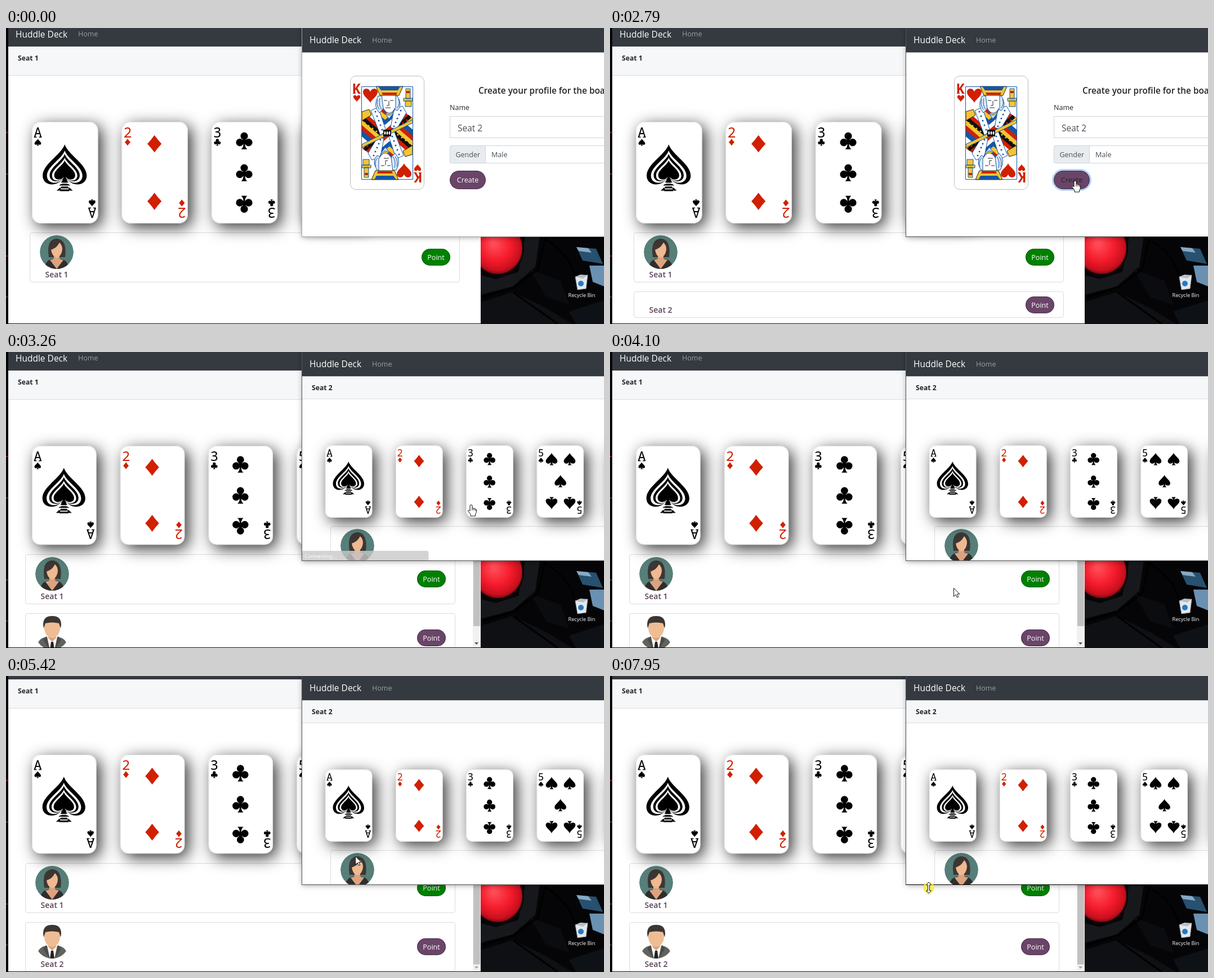
Animation, 1062 px wide and 527 px high, one loop 8000 ms. Source, as an HTML page with a canvas:

```html
<!DOCTYPE html>
<html lang="en">
<head>
<meta charset="utf-8">
<title>Planning cards</title>
<style>
html, body { margin: 0; width: 100%; height: 100%; overflow: hidden; background: #050507; }
canvas { display: block; }
</style>
</head>
<body>
<canvas width="1062" height="527"></canvas>
<script>
const c = document.querySelector('canvas').getContext('2d');
const BRAND = 'Huddle Deck', ONE = 'Seat 1', TWO = 'Seat 2';
const RED = '#d02000', BLUE = '#1556a5', GOLD = '#f2c535', PLUM = '#6a4569', GREEN = '#008000';

const SUIT = {
  spade: 'M0-1C.15-.55.95-.15.95.35C.95.8.35.85.1.5Q.12.85.35 1H-.35Q-.12.85-.1.5C-.35.85-.95.8-.95.35C-.95-.15-.15-.55 0-1Z',
  diamond: 'M0-1Q.39-.45.82 0Q.39.45 0 1Q-.39.45-.82 0Q-.39-.45 0-1Z',
  club: 'M-.43-.54a.43.43 0 1 1 .86 0a.43.43 0 1 1-.86 0ZM-.95.2a.44.44 0 1 1 .88 0a.44.44 0 1 1-.88 0ZM.07.2a.44.44 0 1 1 .88 0a.44.44 0 1 1-.88 0ZM-.2-.3H.2L.1.4Q.1.8.35 1H-.35Q-.1.8-.1.4Z',
  heart: 'M0 1C-.2.5-1 .1-1-.45C-1-1.05-.2-1.1 0-.5C.2-1.1 1-1.05 1-.45C1 .1.2.5 0 1Z'
};

// Pips: x, y in a 117 by 180 card
const CARDS = [
  ['A', 'spade', []],
  ['2', 'diamond', [[58, 39], [58, 141]]],
  ['3', 'club', [[58, 33.5], [58, 90], [58, 146.5]]],
  ['5', 'spade', [[37, 34], [82, 34], [59, 89], [37, 144], [82, 144]]],
  ['8', 'heart', []]
];

// Pointer moves: start, end, number of steps, x, y
const MOVES = [
  [690, 920, 4, 845, 319], [1160, 1300, 3, 844, 251],
  [1540, 1620, 2, 808, 266], [1700, 1700, 1, 827, 275], [1940, 2030, 2, 826, 272],
  [3410, 3640, 4, 612, 368], [3950, 4100, 3, 610, 420],
  [5330, 5560, 4, 630, 221], [5760, 5870, 3, 662, 109], [6100, 6180, 2, 617, 48],
  [6420, 6560, 3, 530, 180], [6640, 6640, 1, 546, 241], [6710, 6790, 2, 571, 314],
  [6940, 7250, 5, 576, 368], [7420, 7480, 2, 567, 373], [7880, 7880, 1, 566, 377]
];

function stepped(t, start, end, n) {
  if (t < start) return 0;
  return Math.min(n, 1 + Math.floor((t - start) / (end - start || 1) * (n - 1) + 1e-6)) / n;
}

function pointer(t) {
  let x = 982, y = 590;
  for (const [start, end, n, tx, ty] of MOVES) {
    const p = stepped(t, start, end, n);
    x += (tx - x) * p;
    y += (ty - y) * p;
  }
  return [x, y];
}

function at(x, y, scale, draw, turn = 0) {
  c.save();
  c.translate(x, y);
  c.scale(scale, scale);
  c.rotate(turn);
  draw();
  c.restore();
}

function shape(d, fill, stroke, width = 1) {
  const p = new Path2D(d);
  if (fill) { c.fillStyle = fill; c.fill(p); }
  if (stroke) { c.strokeStyle = stroke; c.lineWidth = width; c.stroke(p); }
}

function box(x, y, w, h, fill, r = 0, stroke, width = 1) {
  c.beginPath();
  c.roundRect(x, y, w, h, r);
  if (fill) { c.fillStyle = fill; c.fill(); }
  if (stroke) { c.strokeStyle = stroke; c.lineWidth = width; c.stroke(); }
}

function disc(x, y, rx, fill, ry = rx) {
  c.beginPath();
  c.ellipse(x, y, rx, ry, 0, 0, 7);
  c.fillStyle = fill;
  c.fill();
}

function text(s, x, y, size, color, weight = 400, align = 'left', font = '"Open Sans", "Noto Sans", sans-serif') {
  c.font = `${weight} ${size}px ${font}`;
  c.textAlign = align;
  c.fillStyle = color;
  c.fillText(s, x, y);
}

function clip(d, draw) {
  c.save();
  c.clip(new Path2D(d));
  draw();
  c.restore();
}

function shadowed(color, blur, offset, draw) {
  c.save();
  c.shadowColor = color;
  c.shadowBlur = blur;
  c.shadowOffsetX = c.shadowOffsetY = offset;
  draw();
  c.restore();
}

const suit = (kind, x, y, size, color, turn) => at(x, y, size, () => shape(SUIT[kind], color), turn);

function corner(rank, kind, color, x = 10.5, y = 28, weight = 400) {
  text(rank, x, y, 25, color, weight, 'center', '"Noto Sans Mono", monospace');
  if (rank > '9') for (const dx of [-6.5, 2]) box(x + dx, y - 1.6, 4.5, 1.6, color);
  suit(kind, x, y + 8.2, 6.2, color);
}

function card([rank, kind, pips], x, y, w) {
  const color = kind == 'diamond' || kind == 'heart' ? RED : '#000';
  at(x, y, w / 117, () => {
    shadowed('rgba(0,0,0,.8)', 28, 7, () => box(0, 0, 117, 180, '#fff', 15));
    box(.5, .5, 116, 179, '#fff', 15, '#e2e2e2');
    corner(rank, kind, color);
    at(117, 180, 1, () => corner(rank, kind, color), Math.PI);
    for (const [px, py] of pips) suit(kind, px, py, 15.3, color, py > 100 ? Math.PI : 0);
    if (rank == 'A') {
      [[81, 41], [84, 33], [85, 28], [87, 23.5], [88, 19.5]].forEach(([py, size], i) =>
        suit(kind, 58, py, size, i % 2 ? '#fff' : '#000'));
      shape('M55.5 100H60.5L66 123H50Z', '#000');
      for (const py of [108, 113, 118]) box(51, py, 14, 1.8, '#fff');
    }
  });
}

function kingHalf() {
  clip('M-45 22V-27L-16-42H24L45-27V-22Z', () => {
    const bands = [RED, GOLD, BLUE, '#fff', RED, '#111', GOLD, RED, BLUE];
    bands.forEach((color, i) => {
      const y = -74 + i * 9;
      shape(`M-48 ${y}L-4 ${y + 38}L48 ${y - 6}`, null, color, 8.5);
    });
    for (let i = 0; i < 6; i++) {
      disc(-40 + i * 7, -18 + i * 5, 1.6, GOLD);
      disc(42 - i * 7, -28 + i * 5, 1.6, RED);
    }
  });
  shape('M-29-40L-16-46L-2-4L-12 4Z', '#fff', BLUE);
  shape('M12-42L27-48L34-36L16-6L6-10Z', '#fff', BLUE);
  for (let i = 0; i < 5; i++) {
    disc(-21 + i * 3, -38 + i * 8, 1.5, BLUE);
    disc(24 - i * 3, -40 + i * 7, 1.5, BLUE);
  }
  shape('M-45-38L-32-42L-28-32L-45-22Z', GOLD, '#222');
  shape('M-16-66Q-26-48-14-36L-6-44V-66ZM18-66Q28-50 18-40L8-44V-66Z', '#dfe9f4', BLUE);
  shape('M-10-68H15V-46Q4-26-7-44Z', '#fff', BLUE);
  shape('M-6-58h6m5 0h6M3-57v8h-4M-3-45h9', null, '#222');
  shape('M-8-44Q3-20 14-44L10-34L3-25L-3-34Z', '#cbdcee', BLUE);
  shape('M-17-60Q-20-50-14-42M-13-62Q-16-50-10-42M20-60Q24-52 17-44', null, BLUE);
  shape('M-20-83H28L21-67H-13Z', GOLD, '#222');
  shape('M-16-83H23L19-76H-11Z', BLUE);
  shape('M-10-72H18L16-68H-8Z', RED);
  shape('M33-79h8v18h-8ZM29-62h16v5H29ZM32-57h11v10H32Z', GOLD, BLUE);
  box(34, -75, 6, 4, RED);
  suit('heart', -30, -67, 13, RED);
  corner('K', 'heart', RED, -54, -70, 600);
}

function kingCard() {
  box(611.5, 85.5, 131, 202, '#fff', 10, '#bbb');
  at(677, 187, 1, () => {
    kingHalf();
    at(0, 0, 1, kingHalf, Math.PI);
    shape('M-45 20L45-24V-18L-45 26Z', GOLD, BLUE);
    box(-7, -6, 14, 12, '#111');
    for (const x of [-4, 0, 4]) disc(x, 0, 1.4, '#fff', 3);
    box(-45.5, -82.5, 91, 165, null, 0, BLUE);
  });
}

function avatar(x, y, woman) {
  at(x, y, 1, () => {
    c.beginPath();
    c.arc(0, 0, 30, 0, 7);
    c.clip();
    if (woman) {
      disc(0, 0, 30, '#567f79');
      shape('M-14 9Q-19-23 0-24Q19-23 15 9Z', '#3e3633');
      shape('M-21 30Q-21 15-8 12H8Q21 15 21 30Z', '#302d2d');
      shape('M-5 3H5V12L12 14L0 30L-12 14L-5 12Z', '#dda27e');
      shape('M-10-8Q0-8 5-17Q10-12 10-5Q9 7 0 10Q-9 7-10-5Z', '#efb992');
      shape('M-11-4Q-8-20 5-20Q3-8-11-4Z', '#3e3633');
    } else {
      shape('M-27 30Q-28 10-10 7H10Q28 10 27 30Z', '#62635f');
      shape('M-9 7H9L4 30H-4Z', '#fff');
      shape('M-2 16H2L4 30H-4Z', '#222');
      shape('M-10 6L-16 12L-5 30ZM10 6L16 12L5 30Z', '#4b4c49');
      shape('M-7 0H7V9L0 16L-7 9Z', '#dda47d');
      disc(0, -9, 14, '#efbd94', 18);
      shape('M-15-8Q-20-29 0-31Q20-29 15-8L12-17Q0-20-12-17Z', '#3c3532');
    }
  });
}

function pill(label, x, y, w, h, fill, color = '#fff') {
  box(x - w / 2, y - h / 2, w, h, fill, h / 2);
  box(x - w / 2 + .5, y - h / 2 + .5, w - 1, h - 1, null, h / 2, 'rgba(0,0,0,.3)');
  text(label, x, y + 4.7, 12.6, color, 400, 'center');
}

function row(x, y, name, fill, face, h = 88) {
  const full = h > 50;
  box(x + .5, y + .5, 763, h, '#fff', 4, '#dcdcdc');
  if (full) avatar(x + 48, y + 35, face);
  text(name, x + 48, y + (full ? 80 : 38), 14, '#5a4058', 600, 'center');
  pill('Point', x + 721.5, y + (full ? 44 : 24), 51, 30, fill);
}

function header(x, y, bar, sub, name) {
  box(x, y, 840, bar, '#343a40');
  text(BRAND, x + 13, y + bar - 16.5, 15.5, '#fff');
  text('Home', x + 124, y + bar - 18, 12.5, '#9a9da0');
  if (!sub) return;
  box(x, y + bar, 840, sub, '#f6f7f8');
  box(x, y + bar + sub, 840, 1, '#dcdddf');
  text(name, x + 17, y + bar + 24.5, 12.2, '#212529', 700);
}

function desktop() {
  box(0, 0, 1062, 527, '#050507');
  for (const y of [185, 259, 405, 478]) box(0, y, 3, 2, '#7c2638');
  shape('M843 440L870 447L910 434L922 371H948L940 425L900 460L843 475Z', '#17181c');
  shape('M843 488L900 470L962 500L1005 527H843Z', '#0e1014');
  shape('M930 430L985 450L1000 492L960 480Z', '#0b0c10');
  shape('M843 480L902 462L945 430L958 371M900 470L980 527M950 371Q1000 400 1010 440', null, '#000', 3);
  const lamp = c.createRadialGradient(866, 384, 4, 874, 392, 48);
  lamp.addColorStop(0, '#ff4a55');
  lamp.addColorStop(.5, '#f51c2c');
  lamp.addColorStop(.85, '#c80f1d');
  lamp.addColorStop(1, '#5c0a10');
  disc(874, 393, 46, '#100508', 49);
  disc(873, 392, 44, lamp, 46);
  shape('M1013 390L1048 393L1060 420L1024 414Z', '#28506f');
  shape('M1013 390L1034 392L1040 400L1017 397Z', '#88a9c4');
  shape('M1036 423H1062V460L1042 452Z', '#6a91b2');
  shape('M1000 505L1062 485V527H1012Z', '#0e1115');
  shape('M1011 443L1033 440L1030 464L1015 466Z', '#e4e8eb', '#9aa3aa');
  shape('M1011 443L1020 439L1033 440L1025 446Z', '#b8c0c6');
  disc(1021, 455, 5, '#2479c5');
  text('Recycle Bin', 1022.5, 479, 9.2, '#fff', 400, 'center');
}

function leftWindow(t) {
  const late = t >= 3100;
  const scroll = t < 4560 ? 0 : t < 4640 ? 8 : t < 4720 ? 20.5 : 27;
  const x = late ? 34 : 42, y = (late ? 360 : 364) - scroll;
  clip('M4 0H843V526H4Z', () => {
    box(4, 0, 839, 526, '#fff');
    header(4, -scroll, 33, 51, ONE);
    row(x, y, ONE, GREEN, true);
    if (late) row(x, y + 105, TWO, PLUM, false);
    else if (t >= 2790) row(x, y + 105, TWO, PLUM, false, 46);
    for (let i = 0; i < 4; i++)
      card(CARDS[i], 46 + i * (late ? 156.8 : 159.4), 167 - scroll, late ? 114.5 : 117.5);
    if (late) {
      box(829, 0, 14, 526, '#f1f1f1');
      box(830, 17, 12, 471 + scroll * .94, '#c1c1c1');
      shape('M832 517H839L835.5 521Z', scroll == 27 ? '#a3a3a3' : '#505050');
    }
  });
}

function profile(t) {
  const pressed = t >= 2560;
  kingCard();
  text('Create your profile for the board', 839, 117, 15.35, '#212529', 600);
  text('Name', 788, 145.5, 12.5, '#212529');
  box(788.5, 157.5, 300, 38, '#fff', 0, '#ced4da');
  text(TWO, 802, 184, 15.5, '#495057');
  box(788.5, 209.5, 300, 31, '#fff', 3, '#ced4da');
  box(788.5, 209.5, 63, 31, '#e9ecef', [3, 0, 0, 3], '#ced4da');
  text('Gender', 798.5, 230, 12.5, '#495057');
  text('Male', 862, 230, 12.5, '#495057');
  if (pressed) box(786.5, 252.5, 67, 36, null, 18, '#b5d7fb', 3);
  pill('Create', 820, 270.5, 64, 33, PLUM, pressed ? '#2a2029' : '#fff');
}

function board(t) {
  const ready = t >= 3010;
  header(526, 0, 43.5, 39.5, ready ? TWO : '');
  if (ready) {
    row(576, 310, '', PLUM, true);
    CARDS.forEach((k, i) => card(k, 567 + i * 125.2, 166.5, 83.3));
  }
  if (t < 3410) {
    box(526, 354, 224.5, 17, 'rgba(200,200,200,.8)', [0, 3, 0, 0]);
    text('Connecting...', 530, 366.5, 9.5, '#fff');
  }
}

function rightWindow(t) {
  shadowed('rgba(0,0,0,.35)', 9, 1, () => box(525, -10, 560, 381.5, '#fff'));
  clip('M526 0H1062V371H526Z', () => {
    if (t >= 2860) return board(t);
    header(526, 0, 43.5, 0);
    profile(t);
  });
  const edge = t < 2560 ? '#a5a5a5' : '#555';
  box(525, 0, 1, 372, edge);
  box(525, 371, 537, 1, t >= 7880 ? '#000' : edge);
}

function drawPointer(t) {
  if (t < 690) return;
  const [x, y] = pointer(t);
  if (t >= 7880) disc(x, y, t < 7950 ? 14 : 10, 'rgba(250,236,60,.85)');
  at(x, y, 1, () => {
    if (t >= 7420)
      shape('M0-10L4.5-5H1.5V5H4.5L0 10L-4.5 5H-1.5V-5H-4.5Z', '#fff', '#111');
    else if (t >= 1620 && t < 3410) {
      shape('M-2 1Q0-1 2 1V6Q4 5 5 7Q7 6 8 8Q10 8 9.5 11Q9.5 15 7.5 17V20H-1V17L-5.5 11Q-5 8-2 11Z', '#fff', '#111');
      shape('M2 6v4M5 7v3M8 8v3', null, '#111');
    } else
      shape('M.5.5V15.5L4 12L6.3 17L8.7 16L6.4 11H11Z', '#fff', '#111');
  });
}

function frame() {
  const t = performance.now() % 8000;
  desktop();
  leftWindow(t);
  rightWindow(t);
  drawPointer(t);
  requestAnimationFrame(frame);
}
frame();
</script>
</body>
</html>
```
